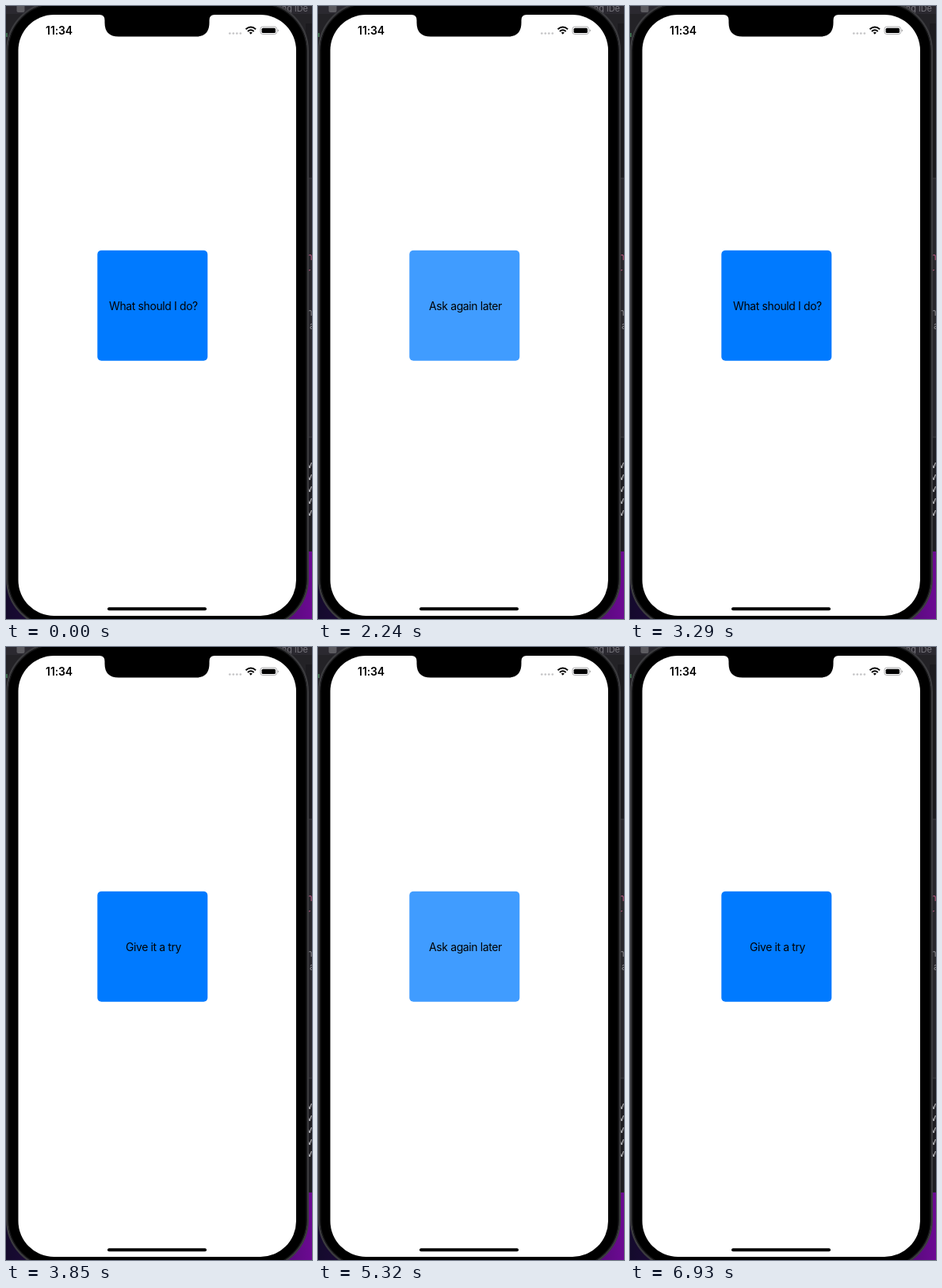
These frames come from a looping animation (386 by 772 pixels, 8.12 s). An HTML page:

```html
<!DOCTYPE html>
<html lang="en">
<head>
<meta charset="utf-8">
<title>What should I do?</title>
<style>
  html, body { margin: 0; width: 100%; height: 100%; overflow: hidden; background: #1d1c20; }
  svg { display: block; width: 100vw; height: 100vh; }
  text { font-family: Inter, Roboto, sans-serif; }
  .label { font-size: 13.92px; letter-spacing: -0.35px; text-anchor: middle; }
  .clock { font-size: 13.9px; font-weight: 600; letter-spacing: -0.1px; text-anchor: middle; }
  .code { font-family: "Noto Sans Mono", monospace; font-size: 11px; }
  #button { fill: #007aff; }
  #button.pressed { fill: #409cff; }
</style>
</head>
<body>
<svg viewBox="0 0 386 772">
  <defs>
    <linearGradient id="wall" x1="0" x2="1" y1="0" y2="0">
      <stop offset="0" stop-color="#140a2c"/>
      <stop offset="0.5" stop-color="#2c0a50"/>
      <stop offset="1" stop-color="#6c0a92"/>
    </linearGradient>
  </defs>

  <!-- desktop behind the phone -->
  <rect width="386" height="772" fill="#232226"/>
  <rect width="386" height="10" fill="#2b2930"/>
  <rect x="13.5" y="-2" width="10" height="10" rx="2" fill="#5c5b60"/>
  <text x="345" y="7" font-size="11" fill="#77757c">ing iDe</text>
  <rect y="34" width="2" height="5" fill="#3d6b4c"/>
  <rect x="378" y="22" width="8" height="195" fill="#1c1b1f"/>
  <rect x="378" y="217" width="8" height="326" fill="#28272c"/>
  <path d="M378 217h8M378 543h8M378 571h8" stroke="#3c3b40"/>
  <rect x="378" y="544" width="8" height="142" fill="#1e1d22"/>
  <rect y="690" width="193" height="82" fill="url(#wall)"/>
  <rect x="193" y="687" width="193" height="85" fill="url(#wall)"/>
  <g class="code">
    <g fill="#c25a86"><text x="380" y="320">n</text><text x="380" y="339">r</text></g>
    <g fill="#8d8c92"><text x="380" y="390">n</text><text x="383" y="407">a</text></g>
    <g id="log" fill="#d0d0d4"></g>
  </g>

  <!-- phone body -->
  <rect x="1.2" y="-4.5" width="379.6" height="787" rx="61" fill="#000" stroke="#3b3b3e" stroke-width="2.4"/>
  <rect x="3" y="-2.7" width="376" height="783.4" rx="59" fill="none" stroke="#19191b" stroke-width="1.2"/>
  <rect x="15.5" y="11" width="350.5" height="757" rx="45" fill="#fff"/>
  <path d="M118 10V11Q124.500 11 124.500 18V21Q124.500 38.500 142 38.500H239Q256.500 38.500 256.500 21V18Q256.500 11 263 11V10Z" fill="#000"/>

  <!-- status bar -->
  <text class="clock" x="67" y="35.800">11:34</text>
  <g fill="#c4c4c6">
    <circle cx="282.300" cy="34.500" r="1.350"/><circle cx="286.800" cy="34.500" r="1.350"/>
    <circle cx="291.300" cy="34.500" r="1.350"/><circle cx="295.800" cy="34.500" r="1.350"/>
  </g>
  <g fill="none" stroke="#000" stroke-width="1.900">
    <path d="M302.500 29.300Q308.800 23.800 315.100 29.300"/>
    <path d="M304.900 32Q308.800 28.700 312.700 32"/>
    <path d="M306.800 33.500Q308.800 32.100 310.800 33.500L308.800 35.700Z" fill="#000" stroke="none"/>
  </g>
  <rect x="321" y="26.100" width="20.600" height="9.400" rx="2.800" fill="none" stroke="#a5a5a7" stroke-width="0.900"/>
  <rect x="322.600" y="27.700" width="17.400" height="6.200" rx="1.500"/>
  <path d="M342.700 29.200q1.400 .5 1.400 1.600t-1.400 1.600z" fill="#a5a5a7"/>

  <rect id="button" x="115.300" y="307.700" width="139" height="139" rx="5"/>
  <text id="label" class="label" x="186" y="382.700">What should I do?</text>
  <rect x="128" y="757.300" width="125" height="4" rx="2"/>
</svg>
<script>
  const LOOP = 8120;
  const ASK = "What should I do?", HOME = "Stay home", LATER = "Ask again later",
        MOM = "Ask your mom", TRY = "Give it a try";

  // Each tap: press time, text change, release, new text
  const taps = [
    [1540, 1540, 1610, HOME],
    [2240, 2240, 2310, LATER],
    [3010, 3150, 3220, ASK],
    [3780, 3780, 3850, TRY],
    [4550, 4550, 4620, MOM],
    [5250, 5320, 5390, LATER],
    [5950, 6020, 6160, HOME],
    [6790, 6860, 6930, TRY]
  ];

  const button = document.getElementById("button");
  const label = document.getElementById("label");

  document.getElementById("log").innerHTML = [582, 597, 612, 627, 642]
    .map(y => `<text x="380" y="${y}">v</text>`).join("");

  function draw(t) {
    let text = ASK, pressed = false;
    for (const [down, change, up, next] of taps) {
      if (t >= change) text = next;
      if (t >= down && t < up) pressed = true;
    }
    if (label.textContent !== text) label.textContent = text;
    button.classList.toggle("pressed", pressed);
  }

  const start = performance.now();
  function tick() {
    draw((performance.now() - start) % LOOP);
    requestAnimationFrame(tick);
  }
  tick();
</script>
</body>
</html>
```
